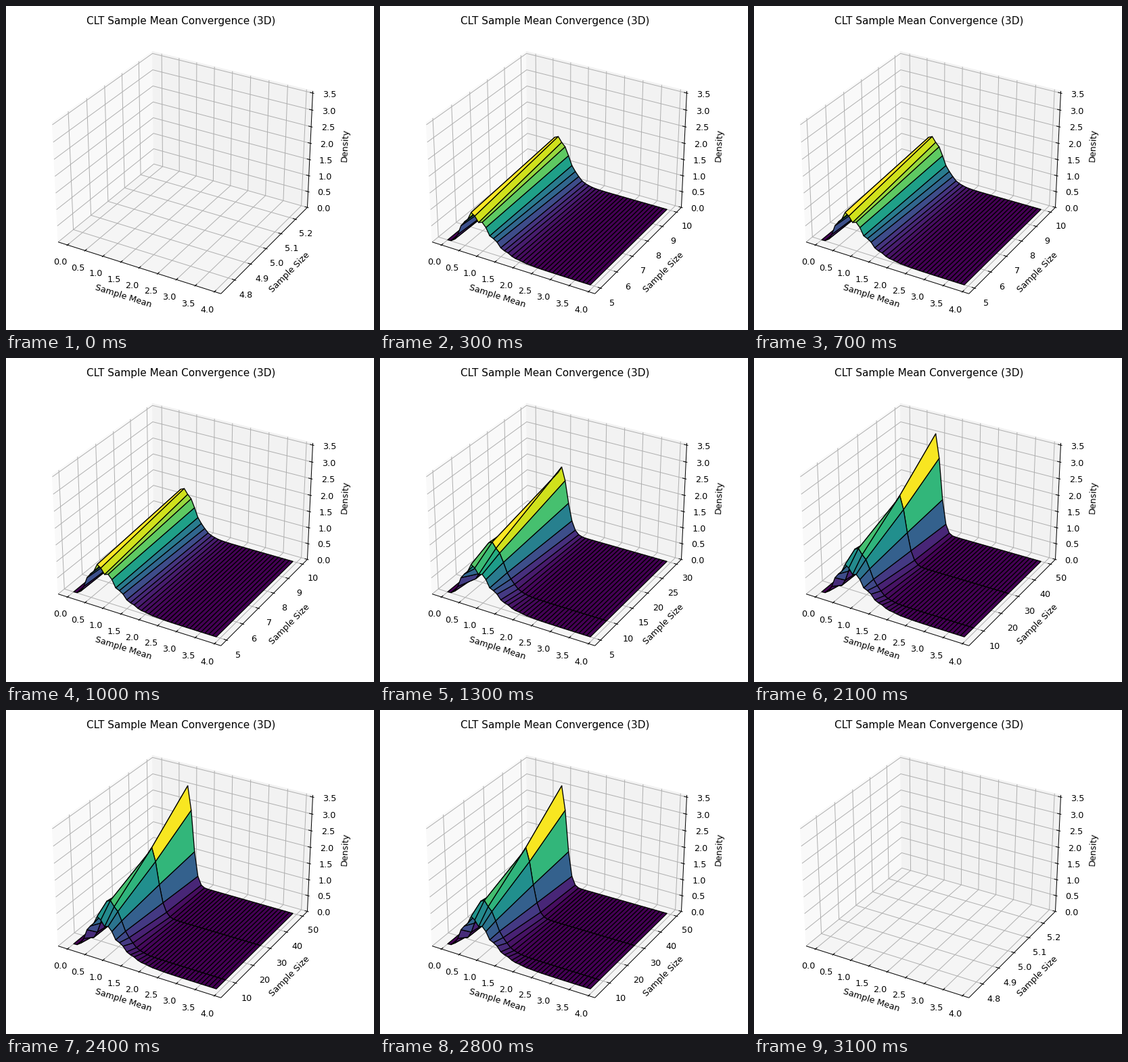
A matplotlib script for the animation above (3200 ms loop, 544 px wide and 480 px high).

```python
import math

import numpy as np
import matplotlib.pyplot as plt
from matplotlib.animation import FuncAnimation
from matplotlib.collections import LineCollection, PolyCollection

W, H, DPI = 544, 480, 64
PX = 72 / DPI  # points per pixel

# Camera: elevation 30, azimuth -60, perspective distance 10
ELEV, AZIM, DIST = math.radians(30), math.radians(-60), 10
EYE = np.array([math.cos(ELEV) * math.cos(AZIM),
                math.cos(ELEV) * math.sin(AZIM), math.sin(ELEV)])
RIGHT = np.array([-math.sin(AZIM), math.cos(AZIM), 0])
UP = np.cross(EYE, RIGHT)
BOX = np.array([1.19047, 1.19047, 0.89285])
CENTER, SCALE = np.array([264.7, 238.2]), np.array([2315, -2257])

# Sample size: (mode, peak density)
PEAKS = {5: (0.75, 1.0), 10: (0.8, 1.34), 30: (0.88, 2.1), 50: (0.9, 3.1)}
SIZES = list(PEAKS)
BINS = np.arange(40)
XS = BINS * 0.1
XLIM, ZLIM = (-0.266, 4.166), (0, 3.56)
PAD = 0.0682        # axis margin as a share of the data range
LABEL_GAP = 0.0691  # tick label distance as a share of the box


def density(n):
    """Gamma curve of the sample mean, with a ripple that fades as n grows."""
    mode, top = PEAKS[n]
    r = XS / mode
    ripple = 1 + 0.5 / n * np.cos(2 * np.pi * (BINS - 4) / 3.25)
    return top * (r * np.exp(1 - r)) ** (n - 1) * ripple


def project(points):
    """Map box fractions (0..1 per axis) to stage pixels."""
    p = (np.asarray(points, float) - 0.5) * BOX
    screen = np.stack([p @ RIGHT, p @ UP], axis=-1)
    return CENTER + SCALE * screen / (DIST - p @ EYE)[..., None]


def share(value, lim):
    return (value - lim[0]) / (lim[1] - lim[0])


def lines(paths, color):
    ax.add_collection(LineCollection([project(p) for p in paths], colors=color,
                                     linewidths=PX, zorder=1), autolim=False)


def text(pos, s, size=12.7, **kw):
    ax.text(*pos, s, fontsize=size * PX, ha="center", **kw)


def tick_at(axis, t):
    """Grid path, tick mark and label anchor for one tick."""
    low, high = -1 / 120, 1 / 60
    if axis == "x":
        return ([(t, 0, 0), (t, 1, 0), (t, 1, 1)],
                [(t, low, 0), (t, high, 0)],
                (t, -LABEL_GAP, -LABEL_GAP))
    if axis == "y":
        return ([(1, t, 0), (0, t, 0), (0, t, 1)],
                [(1 - low, t, 0), (1 - high, t, 0)],
                (1 + LABEL_GAP, t, -LABEL_GAP))
    return ([(0, 0, t), (0, 1, t), (1, 1, t)],
            [(1 - low, 1, t), (1 - high, 1, t)],
            (1 + LABEL_GAP, 1 + LABEL_GAP, t))


def draw_box(ylim, yticks, yformat):
    panes = [[(0, 0, 0), (0, 1, 0), (0, 1, 1), (0, 0, 1)],
             [(0, 1, 0), (1, 1, 0), (1, 1, 1), (0, 1, 1)],
             [(0, 0, 0), (1, 0, 0), (1, 1, 0), (0, 1, 0)]]
    shades = ["#f9f9f9", "#f2f2f2", "#f5f5f5"]
    ax.add_collection(PolyCollection([project(p) for p in panes],
                                     facecolors=shades, edgecolors=shades,
                                     linewidths=PX, zorder=0), autolim=False)
    halves = np.arange(0, 4.01, 0.5)
    grid, marks = [], []
    for axis, lim, values, fmt in (("x", XLIM, halves, "{:.1f}"),
                                   ("y", ylim, yticks, yformat),
                                   ("z", ZLIM, halves[:-1], "{:.1f}")):
        for v in values:
            path, mark, anchor = tick_at(axis, share(v, lim))
            grid.append(path)
            marks.append(mark)
            text(project(anchor) - (0.5, 1.3), fmt.format(v), va="top")
    edges = [[(0, 0, 0), (1, 0, 0)], [(1, 0, 0), (1, 1, 0)], [(1, 1, 0), (1, 1, 1)]]
    lines(grid, "#b0b0b0")
    lines(edges + marks, "black")


def draw_surface(sizes, ylim):
    x, y = np.meshgrid(XS, sizes)
    z = np.array([density(n) for n in sizes])
    p = np.stack([share(x, XLIM), share(y, ylim), share(z, ZLIM)], axis=-1)
    quads = np.stack([p[:-1, :-1], p[:-1, 1:], p[1:, 1:], p[1:, :-1]], axis=2)
    quads = quads.reshape(-1, 4, 3)
    near = ((quads - 0.5) * BOX @ EYE).mean(axis=1)
    quads = quads[np.argsort(near)]
    surface = PolyCollection(project(quads), cmap="viridis", edgecolors="black",
                             linewidths=1.3 * PX, zorder=2)
    surface.set_array(quads[..., 2].mean(axis=1))
    surface.autoscale()
    ax.add_collection(surface, autolim=False)


def draw(i):
    ax.clear()
    ax.set(xlim=(0, W), ylim=(H, 0))
    ax.axis("off")
    stage = ((i - 1) // 10 + 1) % 4
    if stage:
        sizes = SIZES[:stage + 1]
        pad = PAD * (sizes[-1] - sizes[0])
        ylim = (sizes[0] - pad, sizes[-1] + pad)
        yticks = (range(5, 11), range(5, 31, 5), range(10, 51, 10))[stage - 1]
        draw_box(ylim, yticks, "{}")
        draw_surface(sizes, ylim)
    else:
        draw_box((4.716, 5.284), np.arange(4.8, 5.25, 0.1), "{:.1f}")

    text((258.9, 27), "CLT Sample Mean Convergence (3D)", 15.25, va="baseline")
    turned = dict(va="center", rotation_mode="anchor")
    text((173, 429.5), "Sample Mean", rotation=-17.6, **turned)
    text((419.5, 394.5), "Sample Size", rotation=45, **turned)
    text((501.5, 206.5), "Density", rotation=87.3, **turned)
    return []


plt.rcParams["font.family"] = "DejaVu Sans"
fig = plt.figure(figsize=(W / DPI, H / DPI), dpi=DPI, facecolor="white")
ax = fig.add_axes([0, 0, 1, 1])
anim = FuncAnimation(fig, draw, frames=32, interval=100, init_func=lambda: [],
                     repeat=True, repeat_delay=0)
plt.show()
```
